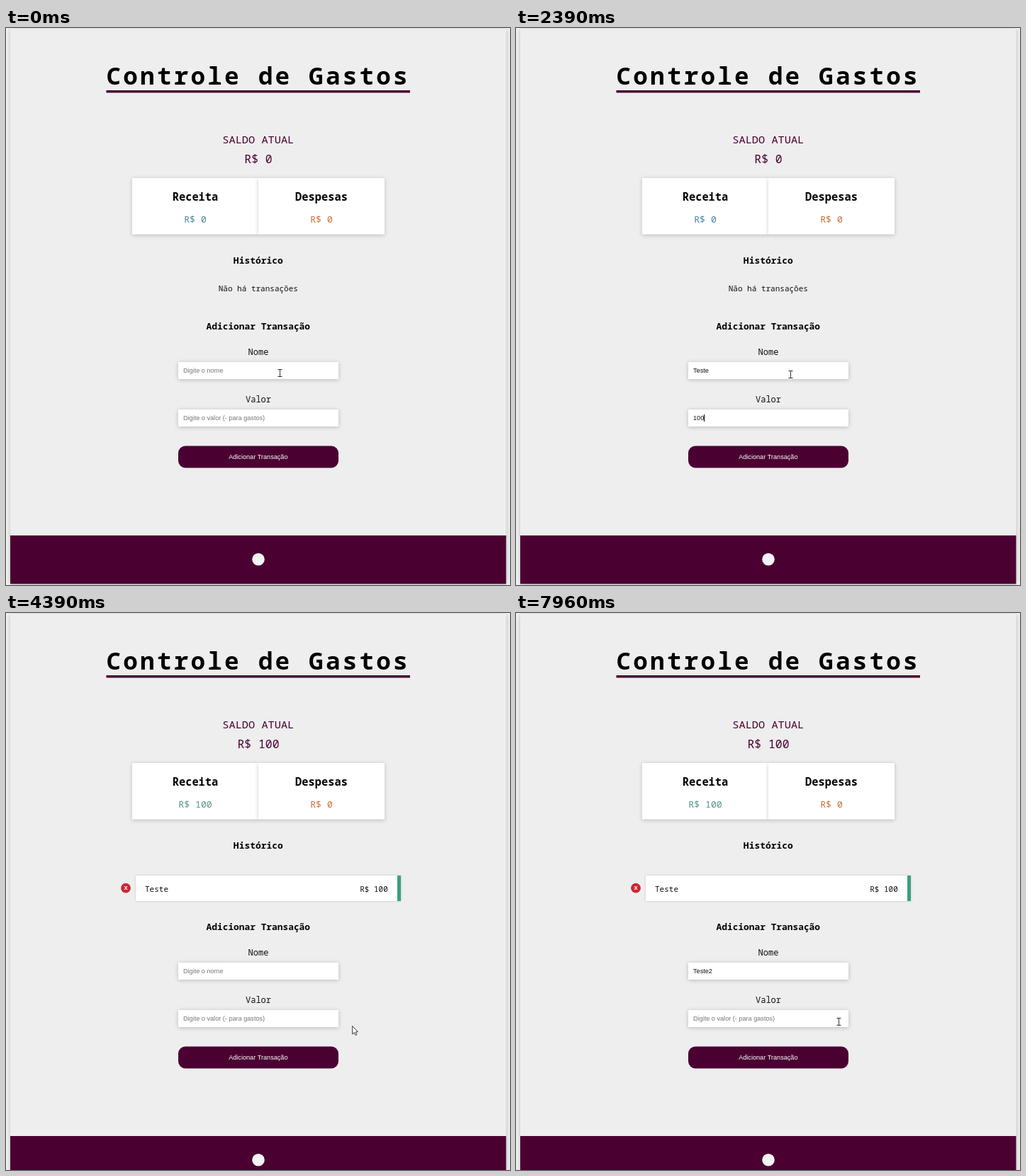
An HTML page with a canvas that plays this animation: 711 by 787 pixels, repeating every 8000 ms.

```html
<!DOCTYPE html>
<html lang="pt-BR">
<head>
<meta charset="utf-8">
<title>Controle de Gastos</title>
<style>
html, body { margin: 0; width: 100%; height: 100%; overflow: hidden; background: #f5f5f5; }
canvas { display: block; width: 711px; height: 787px; }
</style>
</head>
<body>
<canvas id="stage"></canvas>
<script>
const W = 711, H = 787, LOOP = 8000;
const canvas = document.getElementById('stage');
const ctx = canvas.getContext('2d');
const dpr = window.devicePixelRatio || 1;
canvas.width = W * dpr;
canvas.height = H * dpr;

const MONO = '"Roboto Mono", "Noto Sans Mono", monospace';
const SANS = '"Liberation Sans", Arial, sans-serif';
const MENU = '"Open Sans", "Noto Sans", sans-serif';
const PURPLE = '#4b0032';

const NAMES = ['teste', 'Salário', 'ttt', 'teset', 'Teste', 'Camiseta', 'teste2'];
const VALUES = ['100', '10', '150', '120', '15', '1200'];

// time, x, y of the pointer
const PATH = [
  [0, 386, 488], [160, 386, 488], [230, 387, 490], [2590, 387, 490],
  [2800, 470, 515], [2990, 527, 560], [3110, 505, 600], [3200, 465, 606],
  [3370, 450, 607], [4150, 450, 607], [4530, 511, 570], [4700, 470, 545],
  [4950, 360, 512], [5080, 334, 505], [5200, 334, 505], [5280, 380, 503],
  [5350, 451, 499], [5420, 512, 493], [5490, 555.5, 488.5], [7340, 555.5, 488.5],
  [7460, 572, 464], [7560, 565, 476], [7720, 520, 532], [7960, 455, 578]
];
const CLICKS = [[70, 255], [3770, 3830], [5080, 5215]];
// spans in which the text caret is lit, per field
const NAME_CARET = [[130, 590], [790, 1320], [5145, 5690], [6080, 6960], [7090, 7600]];
const VALUE_CARET = [[1450, 2830], [3330, 3770]];
const ADDED = 3830;

const within = (t, spans) => spans.some(([a, b]) => t >= a && t < b);
const ramp = (t, a, b) => Math.min(1, Math.max(0, (t - a) / (b - a)));

function typed(text, t, start, step) {
  return text.slice(0, t < start ? 0 : Math.floor((t - start) / step) + 1);
}

function pointer(t) {
  const i = PATH.findIndex(k => k[0] > t);
  if (i < 0) return PATH[PATH.length - 1].slice(1);
  const [a, x0, y0] = PATH[i - 1], [b, x1, y1] = PATH[i];
  const u = ramp(t, a, b);
  return [x0 + (x1 - x0) * u, y0 + (y1 - y0) * u];
}

function matches(list, text) {
  const key = text.toLowerCase();
  const hits = list.filter(s => s.toLowerCase().startsWith(key));
  const exact = hits.length === 1 && hits[0].toLowerCase() === key;
  return exact ? [] : hits.slice(0, 6);
}

// y is the middle of the capitals
function text(str, x, y, size, o = {}) {
  ctx.font = `${o.weight || 400} ${size}px ${o.font || MONO}`;
  ctx.textAlign = o.align || 'center';
  ctx.letterSpacing = (o.gap || 0) + 'px';
  ctx.fillStyle = o.color || '#000';
  ctx.fillText(str, x, y + size * 0.357);
  ctx.letterSpacing = '0px';
}

function box(x, y, w, h, color, { r = 0, blur = 0, dy = 0, alpha = 0 } = {}) {
  ctx.save();
  ctx.shadowColor = `rgba(0,0,0,${alpha})`;
  ctx.shadowBlur = blur * dpr;
  ctx.shadowOffsetY = dy * dpr;
  ctx.fillStyle = color;
  ctx.beginPath();
  ctx.roundRect(x, y, w, h, r);
  ctx.fill();
  ctx.restore();
}

function disc(x, y, r, color) {
  ctx.fillStyle = color;
  ctx.beginPath();
  ctx.arc(x, y, r, 0, 7);
  ctx.fill();
}

function card(x, title, amount, color) {
  box(x, 212, 178, 79.5, '#fff', { blur: 6, dy: 1, alpha: 0.2 });
  text(title, x + 89, 239, 15.4, { weight: 700 });
  text(amount, x + 89, 270.5, 13.15, { color });
}

function field(y, value, hint, caret) {
  box(243, y, 226, 24, '#fff', { blur: 6, dy: 1, alpha: 0.22 });
  const o = { font: SANS, align: 'left', color: value ? '#111' : '#757575' };
  text(value || hint, 250, y + 12, 9.15, o);
  if (caret) {
    const x = 250 + (value ? ctx.measureText(value).width : 0);
    ctx.fillStyle = '#000';
    ctx.fillRect(Math.round(x), y + 7, 1, 10);
  }
}

function menu(y, items, alpha) {
  if (!items.length || alpha <= 0) return;
  ctx.save();
  ctx.globalAlpha = alpha;
  box(243, y, 226, items.length * 24.6 + 11.4, '#292a2d', { r: 1.5, blur: 3, dy: 1, alpha: 0.4 });
  items.forEach((s, i) => text(s, 250, y + 18.4 + i * 24.6, 8.3,
    { font: MENU, weight: 600, align: 'left', color: '#f1f1f3' }));
  ctx.restore();
}

function ibeam(x, y) {
  const stroke = (color, width) => {
    ctx.strokeStyle = color;
    ctx.lineWidth = width;
    ctx.beginPath();
    ctx.moveTo(x - 2.5, y - 5);
    ctx.lineTo(x + 3.5, y - 5);
    ctx.moveTo(x + 0.5, y - 5);
    ctx.lineTo(x + 0.5, y + 5);
    ctx.moveTo(x - 2.5, y + 5);
    ctx.lineTo(x + 3.5, y + 5);
    ctx.stroke();
  };
  stroke('rgba(255,255,255,.6)', 2);
  stroke('#333', 1);
}

function arrow(x, y) {
  const pts = [[0, 0], [0, 11.5], [2.6, 9.2], [4.4, 13], [6.2, 12.2], [4.5, 8.5], [7.7, 8.2]];
  ctx.beginPath();
  pts.forEach(([a, b]) => ctx.lineTo(x + a, y + b));
  ctx.closePath();
  ctx.fillStyle = '#fff';
  ctx.fill();
  ctx.strokeStyle = '#222';
  ctx.lineWidth = 0.9;
  ctx.stroke();
}

function historyRow() {
  box(183, 371, 374, 36, '#fff', { blur: 3, alpha: 0.18 });
  ctx.fillStyle = '#3b9f7d';
  ctx.fillRect(552, 371, 5, 36);
  text('Teste', 196, 389.7, 11, { align: 'left', color: '#111' });
  text('R$ 100', 538.8, 389.7, 11, { align: 'right', color: '#111' });
  disc(169, 388.7, 6.9, '#cc2731');
  text('x', 169, 388.2, 9.2, { font: SANS, weight: 700, color: '#fff' });
}

function draw(t) {
  const added = t >= ADDED;
  const dy = added ? 22 : 0;
  const money = added ? 'R$ 100' : 'R$ 0';
  ctx.setTransform(dpr, 0, 0, dpr, 0, 0);
  ctx.fillStyle = '#f6f6f6';
  ctx.fillRect(0, 0, W, H);
  box(6, 1, 699.5, 784.5 + dy, '#eeeeee', { blur: 8, alpha: 0.25 });

  text('Controle de Gastos', 141.5, 68, 34.3, { weight: 700, align: 'left', gap: 3.22 });
  ctx.fillStyle = PURPLE;
  ctx.fillRect(141.5, 88, 428.5, 3.5);
  text('SALDO ATUAL', 355.8, 157.8, 15.3, { color: PURPLE });
  text(money, 356, 185.3, 16.45, { color: PURPLE });
  card(178, 'Receita', money, added ? '#54918a' : '#4a83a0');
  card(356, 'Despesas', 'R$ 0', '#c4703a');
  text('Histórico', 355.8, 328.3, 12.95, { weight: 700 });
  if (added) historyRow();
  else text('Não há transações', 355.8, 368, 11, { color: '#111' });

  // form
  const name = added
    ? typed('Teste', t, 6080, 70) + (t >= 7090 ? '2' : '')
    : typed('Teste', t, 790, 80);
  const value = added ? '' : typed('100', t, 1850, 235);
  text('Adicionar Transação', 355.8, 421.3 + dy, 12.85, { weight: 700 });
  text('Nome', 356, 458 + dy, 12, { color: '#111' });
  field(472 + dy, name, 'Digite o nome', within(t, NAME_CARET));
  text('Valor', 356, 525 + dy, 12, { color: '#111' });
  field(539 + dy, value, 'Digite o valor (- para gastos)', within(t, VALUE_CARET));

  const hover = ramp(t, 3220, 3370) - ramp(t, 4000, 4220);
  const mix = (a, b) => Math.round(a + (b - a) * hover);
  box(243, 590.5 + dy, 226, 31, `rgb(${mix(75, 75)},${mix(0, 82)},${mix(50, 117)})`,
    { r: 10, blur: 4 * hover, dy: hover, alpha: 0.2 * hover });
  text('Adicionar Transação', 355.8, 606 + dy, 9.15, { font: SANS, color: '#fff' });

  // footer
  ctx.fillStyle = PURPLE;
  ctx.fillRect(6, 717 + dy, 699.5, 68.5);
  disc(356, 750.7 + dy, 8.8, '#f4f4f4');

  // suggestions
  if (t >= 130 && t < 1530) menu(497.3, matches(NAMES, name), 1 - ramp(t, 1370, 1530));
  if (t >= 1850 && !added) menu(564.3, matches(VALUES, value), 1);
  if (t >= 5145) menu(519.3, matches(NAMES, name), 1);

  // pointer
  const [x, y] = pointer(t);
  if (within(t, CLICKS)) disc(x - 1, y, 8.3, 'rgba(250,240,80,.8)');
  const over = top => x >= 243 && x <= 469 && y >= top + dy && y <= top + dy + 24;
  if (over(472) || over(539)) ibeam(Math.round(x), Math.round(y) - 0.5);
  else arrow(x, y);
}

const start = performance.now();
function tick() {
  draw((performance.now() - start) % LOOP);
  requestAnimationFrame(tick);
}
tick();
</script>
</body>
</html>
```
